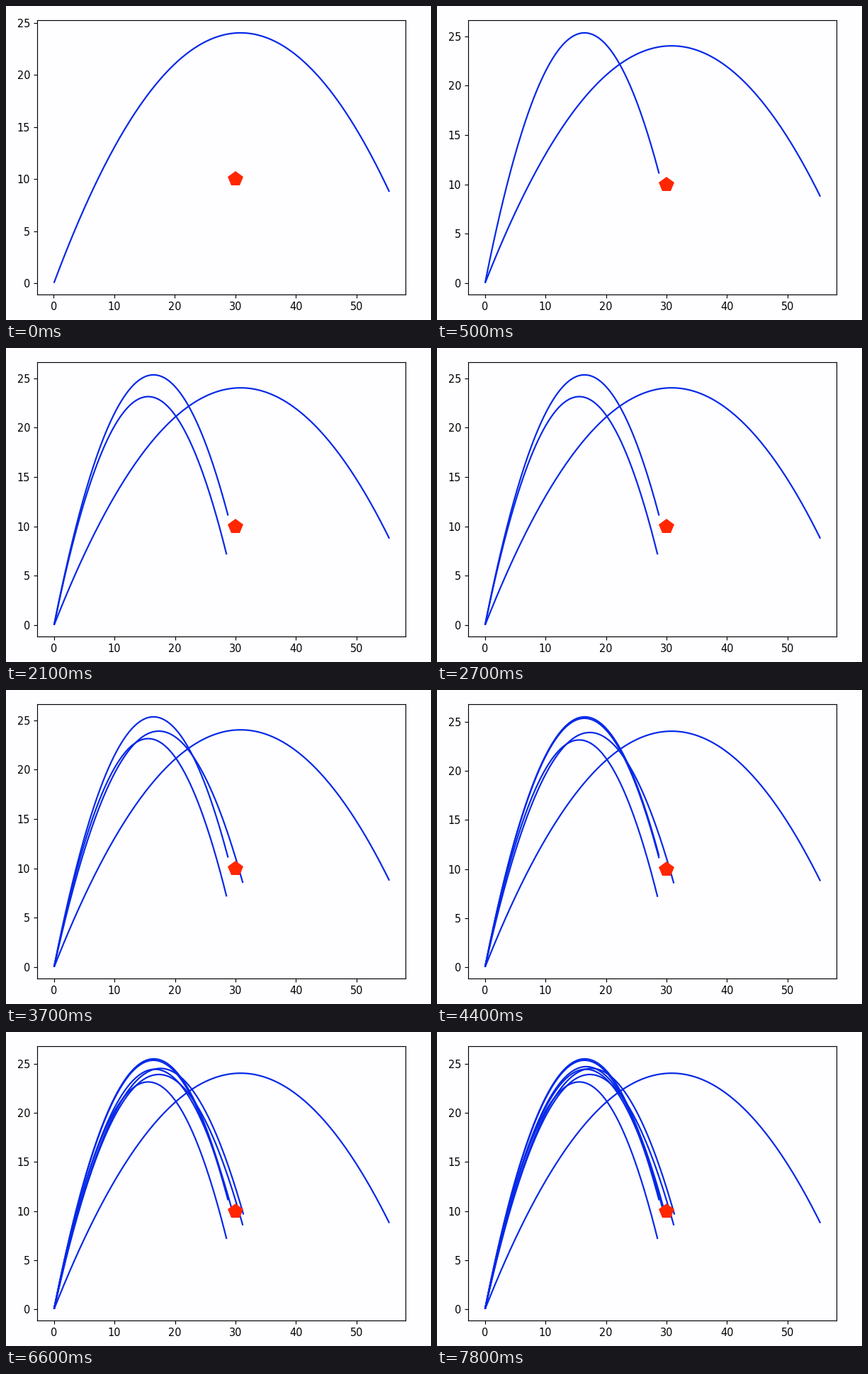
A matplotlib script that plays this animation: 600x443 px, repeating every 8000 ms.

```python
import numpy as np
import matplotlib.pyplot as plt
from matplotlib.animation import FuncAnimation
from matplotlib.ticker import MultipleLocator

W, H, DPI = 600, 443, 100
STEP, LOOP = 100, 8000      # ms
SCALE = 1.0464              # enlargement of the default plot style
BLUE, RED, PAPER = "#0428e8", "#ff2600", "#fefdff"
GRAVITY = 9.81
FLIGHT = np.linspace(0.005, 3.972, 200)     # seconds in the air
TARGET = 30, 10

# launch time in ms, speed in m/s, angle in radians
SHOTS = [
    (0, 25.8, 1.0),
    (500, 23.44, 1.257),
    (2100, 22.48, 1.246),
    (3200, 23.03, 1.223),
    (4400, 23.5, 1.258),
    (5500, 23.3, 1.226),
    (6600, 23.13, 1.242),
    (7600, 23.24, 1.244),
]

plt.rcParams.update({
    "font.family": "DejaVu Sans",
    "font.size": 10 * SCALE,
    "axes.linewidth": 0.8 * SCALE,
    "lines.linewidth": 1.5 * SCALE,
})
for axis in ("xtick", "ytick"):
    plt.rcParams.update({
        f"{axis}.major.size": 3.5 * SCALE,
        f"{axis}.major.width": 0.8 * SCALE,
        f"{axis}.major.pad": 3.5 * SCALE,
    })


def trajectory(speed, angle):
    x = speed * np.cos(angle) * FLIGHT
    y = speed * np.sin(angle) * FLIGHT - GRAVITY * FLIGHT ** 2 / 2
    return x, y


fig = plt.figure(figsize=(W / DPI, H / DPI), dpi=DPI, facecolor=PAPER)
left, right, top, bottom = 44.45, 564.3, 20.3, 407.3
ax = fig.add_axes([left / W, 1 - bottom / H, (right - left) / W, (bottom - top) / H],
                  facecolor=PAPER)
ax.xaxis.set_major_locator(MultipleLocator(10))
ax.yaxis.set_major_locator(MultipleLocator(5))

lines = [ax.plot(*trajectory(speed, angle), color=BLUE)[0] for _, speed, angle in SHOTS]
ax.plot(*TARGET, "p", ms=15.2 * SCALE, color=RED, mew=0, zorder=5, snap=False)


def draw(i):
    for (launch, *_), line in zip(SHOTS, lines):
        line.set_visible(i * STEP >= launch)
    ax.relim(visible_only=True)
    ax.autoscale(True)
    return lines


anim = FuncAnimation(fig, draw, frames=LOOP // STEP, interval=STEP,
                     init_func=lambda: draw(0), repeat=True, repeat_delay=0)
plt.show()
```
